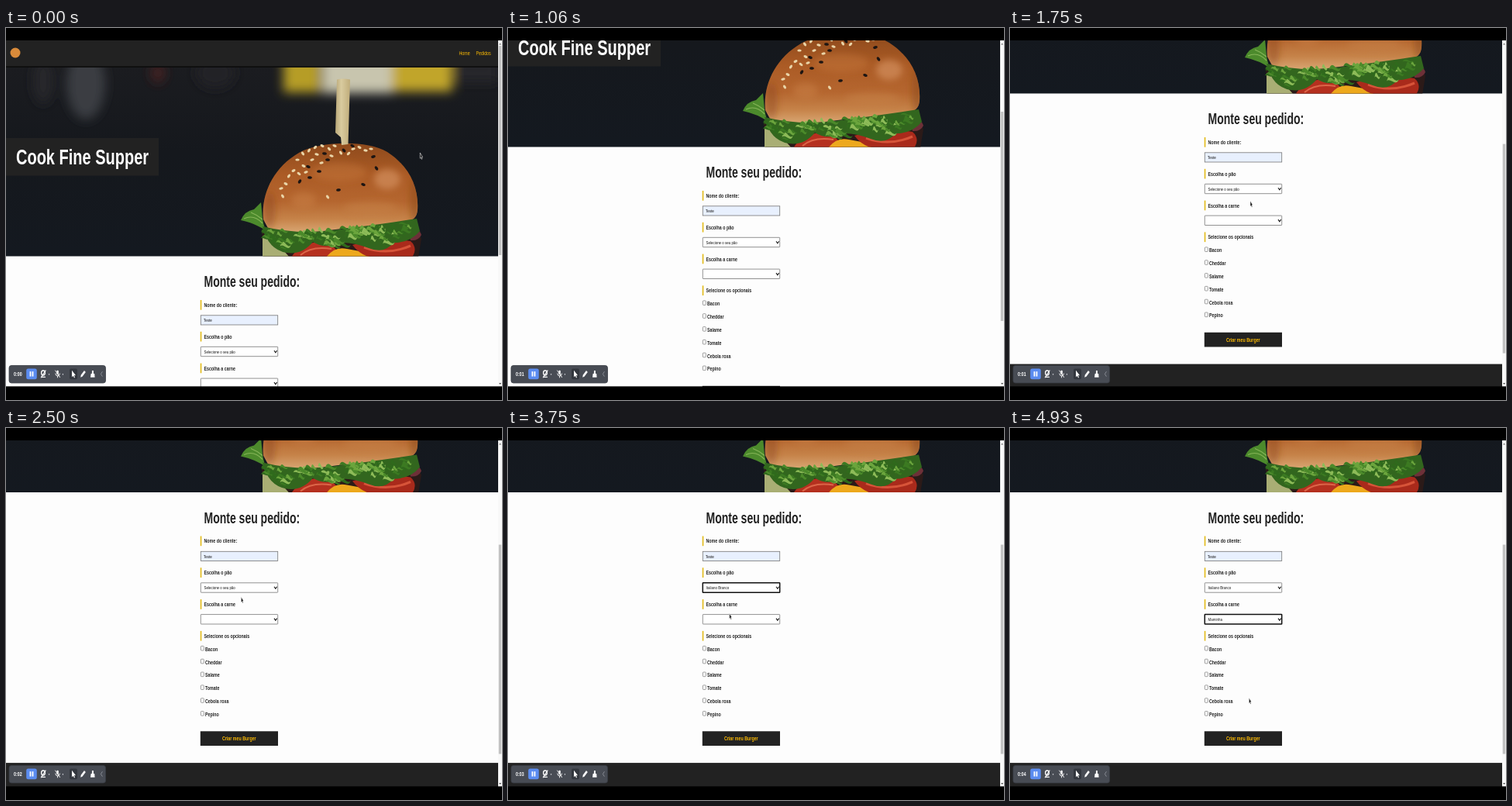
An HTML page that plays this animation: 640 by 480 pixels, repeating every 5000 ms.

```html
<!DOCTYPE html>
<html lang="pt">
<head>
<meta charset="utf-8">
<title>Monte seu pedido</title>
<style>
  html, body { margin: 0; width: 100%; height: 100%; overflow: hidden; background: #000; }
  svg { display: block; width: 640px; height: 480px; }
  text { font-family: "Liberation Sans", Arial, sans-serif; white-space: pre; }
</style>
</head>
<body>
<svg id="stage" viewBox="0 0 640 480"></svg>
<script>
const LOOP = 5000;
// The 1920px wide page is shown squeezed into the stage.
const SX = 1 / 3, SY = 0.47;
const INK = '#222', GOLD = '#fcba03';

const rect = (x, y, w, h, fill, more = '') =>
  `<rect x="${x}" y="${y}" width="${w}" height="${h}" fill="${fill}" ${more}/>`;
const path = (d, fill, more = '') => `<path d="${d}" fill="${fill}" ${more}/>`;
const oval = (x, y, rx, ry, fill, more = '') =>
  `<ellipse cx="${x}" cy="${y}" rx="${rx}" ry="${ry}" fill="${fill}" ${more}/>`;
const text = (x, y, size, str, fill = INK, more = '') =>
  `<text transform="translate(${x} ${y}) scale(${SX} ${SY})" font-size="${size}" fill="${fill}" ${more}>${str}</text>`;
const BOLD = 'font-weight="700"';

function random(seed) {
  return () => (seed = (seed * 16807) % 2147483647) / 2147483647;
}

const defs = `<defs>
  <linearGradient id="bun" x1="0" y1="0" x2="0" y2="1">
    <stop offset="0" stop-color="#8e4a1c"/><stop offset=".35" stop-color="#ab5b25"/>
    <stop offset=".65" stop-color="#b5662f"/><stop offset=".85" stop-color="#c68349"/>
    <stop offset="1" stop-color="#d9a673"/>
  </linearGradient>
  <linearGradient id="wall" x1="0" y1="0" x2="0" y2="1">
    <stop offset="0" stop-color="#1b1c20"/><stop offset=".45" stop-color="#15181d"/>
    <stop offset="1" stop-color="#141920"/>
  </linearGradient>
  <linearGradient id="wood"><stop offset="0" stop-color="#b9a777"/>
    <stop offset=".4" stop-color="#d9cb9f"/><stop offset="1" stop-color="#c0ad7b"/></linearGradient>
  <filter id="soft" x="-50%" y="-50%" width="200%" height="200%"><feGaussianBlur stdDeviation="7"/></filter>
  <filter id="glow" x="-50%" y="-50%" width="200%" height="200%"><feGaussianBlur stdDeviation="4"/></filter>
  <clipPath id="hero"><rect x="0" y="50" width="635" height="244.5"/></clipPath>
  <clipPath id="bunClip"><use href="#bunShape"/></clipPath>
</defs>`;

function lettuce() {
  const rnd = random(77), greens = ['#2f6a1c', '#4b8a2a', '#6ba53d', '#3c7a22', '#8dbb58'];
  let out = path('M303 248 Q308 236 320 234 L329 225 L331 246 Q333 258 336 262 Q322 252 303 248Z', '#4c8a2c')
    + path('M307 246 Q320 240 331 252 M316 238 Q324 241 331 247', 'none', 'stroke="#86b558" stroke-width="1.2"')
    + path('M331 256 Q380 268 430 260 Q490 252 530 246 L534 262 Q522 277 500 277 Q488 292 468 284 Q448 276 430 277 Q412 286 396 276 Q382 293 362 290 Q338 286 331 256Z', '#32661e');
  for (let i = 0; i < 105; i++) {
    const u = rnd(), x = 333 + 196 * u;
    const top = 260 - 12 * u * u, depth = 17 + 8 * Math.sin(u * 19 - 1.2);
    const y = top + depth * rnd(), w = 3 + 5 * rnd(), h = 2 + 3 * rnd();
    const color = greens[Math.floor(rnd() * greens.length)];
    out += path(`M${x - w} ${y + h} q${w * .3} ${-h * 2.4} ${w} ${-h} t${w} ${h * .4} q${-w * .2} ${h * 1.6} ${-w} ${h * .7} t${-w} ${-h * .1}z`, color);
  }
  return out;
}

function burger() {
  const pale = [383,162, 391,158, 399,154, 408,152, 417,156, 424,152, 376,170, 384,178, 371,184,
    365,191, 378,188, 361,201, 357,217, 395,170, 401,163, 420,165, 407,174, 448,156, 456,154,
    464,158, 471,156, 432,161, 442,162, 415,218, 387,186, 355,207];
  const dark = [429,209, 461,202, 478,181, 474,166, 415,170, 404,185, 390,179, 411,162,
    392,193, 379,198, 436,158, 447,152];
  const seeds = (list, fill, rx, ry) => {
    let out = '';
    for (let i = 0; i < list.length; i += 2) {
      const [x, y] = [list[i], list[i + 1]];
      out += oval(x, y, rx, ry, fill, `transform="rotate(${(x * 37 + y * 11) % 120 - 60} ${x} ${y})"`);
    }
    return out;
  };
  return path('M330 262 H532 L536 272 L532 296 H332Z', '#2b1a18')
    + path('M331 268 Q350 276 366 296 H331Z', '#a9ae74')
    + path('M368 296 Q378 279 402 276 Q425 276 431 296Z', '#b5301f')
    + path('M380 293 Q394 281 420 285', 'none', 'stroke="#dc6548" stroke-width="2"')
    + path('M413 296 Q424 281 440 285 L462 289 L470 296Z', '#eda81c')
    + path('M447 280 Q480 268 522 275 Q532 284 524 296 H470 Q456 292 447 280Z', '#a92a1b')
    + path('M462 283 Q492 294 522 281', 'none', 'stroke="#d75439" stroke-width="3"')
    + path('M520 262 Q534 258 536 267 Q532 275 522 274Z', '#6d3038')
    + `<path id="bunShape" fill="url(#bun)" d="M332 247C329 214 345 180 378 161C405 146 465 144 492 160C520 178 533 205 531 235C530 246 524 250 505 252C480 258 450 256 425 260C395 265 350 266 338 258Z"/>`
    + `<g clip-path="url(#bunClip)"><g filter="url(#glow)">`
    + oval(492, 195, 17, 13, '#d69361', 'opacity=".65"') + oval(430, 186, 35, 12, '#c97a3e', 'opacity=".4"')
    + oval(384, 222, 16, 10, '#c98145', 'opacity=".5"') + oval(340, 235, 8, 24, '#844019', 'opacity=".4"')
    + oval(528, 222, 7, 30, '#874519', 'opacity=".5"') + oval(470, 232, 35, 8, '#c58147', 'opacity=".5"')
    + `</g></g>`
    + seeds(pale, '#ead5a8', 2.7, 1.6) + seeds(dark, '#1d1512', 2.9, 1.8)
    + path('M427 66.5 Q435 64.5 444 66.5 L441.5 150 L433 151 L432 141 L425 135Z', 'url(#wood)')
    + lettuce();
}

function hero() {
  const blur = oval(103, 72, 25, 46, '#3a3d42') + oval(48, 68, 13, 30, '#25272b')
    + oval(196, 58, 9, 13, '#442023') + oval(270, 58, 25, 20, '#202125')
    + rect(358, 38, 48, 45, '#b69d25') + rect(408, 30, 92, 54, '#c8c5ae')
    + rect(498, 35, 78, 47, '#c1a52c') + rect(580, 30, 55, 40, '#27282c');
  return `<g clip-path="url(#hero)">${rect(0, 50, 635, 245, 'url(#wall)')}<g filter="url(#soft)">${blur}</g>${burger()}</g>`
    + rect(0, 142, 197, 48.5, INK)
    + text(13, 176, 60, 'Cook Fine Supper', '#fff', BOLD);
}

const label = (y, str) => rect(250.7, y - 6.3, 1.7, 12.7, '#e3bd22') + text(255.4, y + 2.6, 16, str, INK, BOLD);

const select = (y, id, value) =>
  rect(251.3, y, 99.4, 12.4, '#fff', `id="${id}Box" stroke="#767676" stroke-width=".8" rx=".5"`)
  + text(255.6, y + 8.3, 13.33, value, '#111', `id="${id}"`)
  + path(`M346 ${y + 5} l1.8 2.6 l1.8 -2.6`, 'none', 'stroke="#111" stroke-width="1.1"');

function form() {
  const extras = ['Bacon', 'Cheddar', 'Salame', 'Tomate', 'Cebola roxa', 'Pepino'];
  return text(255.5, 334, 42, 'Monte seu pedido:', INK, BOLD)
    + label(357.3, 'Nome do cliente:')
    + rect(251.3, 370.8, 99.4, 12.2, '#e8f0fe', 'stroke="#767676" stroke-width=".8"')
    + text(255, 379.2, 13.33, 'Teste', '#111')
    + label(398.1, 'Escolha o pão') + select(411.3, 'bread', 'Selecione o seu pão')
    + label(438.9, 'Escolha a carne') + select(452.1, 'meat', '')
    + label(479.7, 'Selecione os opcionais')
    + extras.map((name, i) => {
      const y = 496.5 + i * 16.83;
      return rect(251.4, y - 3.6, 3.9, 5.6, '#fff', 'rx=".8" stroke="#767676" stroke-width=".7"')
        + text(257, y + 2.8, 16, name, INK, BOLD);
    }).join('')
    + rect(250.8, 602.8, 100.2, 18.7, INK)
    + text(300.8, 614.6, 16, 'Criar meu Burger', GOLD, BOLD + ' text-anchor="middle"');
}

function page() {
  return rect(0, 16, 635, 660, '#fdfdfd')
    + hero()
    + rect(0, 16, 635, 34, INK) + rect(0, 49.3, 635, 1.6, '#0c0c0c')
    + `<circle cx="12" cy="32" r="6.5" fill="#d98b3a"/>`
    + text(584.5, 34.8, 16, 'Home', GOLD) + text(606.5, 34.8, 16, 'Pedidos', GOLD)
    + form()
    + rect(0, 643.6, 635, 34, INK);
}

function toolbar() {
  const line = (d, w = 1.2, c = '#fff') => path(d, 'none', `stroke="${c}" stroke-width="${w}" stroke-linecap="round"`);
  return rect(4, 435.5, 124.5, 22.5, '#484c54', 'rx="3" stroke="#393d44" stroke-width=".8"')
    + text(10, 449, 16, '0:00', '#fff', BOLD + ' id="clock"')
    + rect(26.2, 439.5, 13.6, 13.8, '#5b8cf0', 'rx="2.5"')
    + rect(30.6, 443.2, 1.8, 6.4, '#fff') + rect(33.6, 443.2, 1.8, 6.4, '#fff')
    + oval(48, 445, 2.4, 3, 'none', 'stroke="#fff" stroke-width="1.3"')
    + line('M46 450.4 H50.4') + line('M45.4 450.8 L51 442')
    + oval(55.6, 446.8, .7, .9, '#d0d3d8')
    + rect(65.4, 441.8, 2.4, 5.4, '#fff', 'rx="1.2"')
    + line('M63.8 446 Q64 449 66.6 449 Q69.2 449 69.4 446 M66.6 449 V451', .9) + line('M63.6 442 L69.6 450.6', .9)
    + oval(73.4, 446.8, .7, .9, '#d0d3d8')
    + rect(82, 439.6, 10, 13.6, '#33373e', 'rx="2"')
    + path('M85 441.8 V450.4 L86.7 448.7 L88 451.6 L89 451 L87.8 448.2 H90Z', '#fff')
    + path('M96.2 450.8 L96.7 447.7 L101 442 L102.8 444 L98.5 449.8Z', '#fff')
    + path('M111 442 H112.8 L113 446 H114.2 L114.6 450.8 H109 L109.6 446 H110.8Z', '#fff')
    + line('M124.2 443.6 L122.4 446.5 L124.2 449.4', .9, '#8f949c');
}

const stage = document.getElementById('stage');
stage.innerHTML = defs
  + `<g id="page">${page()}</g>`
  + rect(635, 16, 5, 447, '#f8f8f8')
  + rect(635.8, 23, 3.4, 270, '#c1c1c1', 'id="thumb"')
  + path('M636.2 21.4 l1.4 -2 l1.4 2z', '#666') + path('M636.2 458 l1.4 2 l1.4 -2z', '#444')
  + rect(0, 0, 640, 16, '#000') + rect(0, 462.4, 640, 18, '#000')
  + toolbar()
  + `<g id="cursor">${path('M0 0 V7.2 L1 6.2 L1.9 8.3 L2.8 7.7 L2 5.6 H3.3Z', '#111', 'stroke="#fff" stroke-width=".55"')}</g>`;

const el = id => document.getElementById(id);
const ease = u => u * u * (3 - 2 * u);

// Rows are [time, ...values]; values ease from one row to the next.
function at(track, t) {
  let i = 0;
  while (i < track.length - 2 && t >= track[i + 1][0]) i++;
  const [a, b] = [track[i], track[i + 1]];
  const u = ease(Math.min(1, Math.max(0, (t - a[0]) / (b[0] - a[0]))));
  return a.slice(1).map((v, k) => v + (b[k + 1] - v) * u);
}

const scrollTrack = [[0, 0], [60, 0], [460, 70], [600, 70], [1010, 141], [1180, 141], [1720, 210], [1760, 210], [1880, 211.5]];
const cursorTrack = [[0, 534.3, 161], [500, 524.3, 108], [1400, 330, 205], [1750, 310, 223],
  [2200, 304, 206], [2700, 303, 224], [3450, 303, 224], [3950, 276.3, 247], [4350, 276.3, 247], [4930, 308.3, 348]];

function setFocus(id, on) {
  const box = el(id + 'Box');
  box.setAttribute('stroke', on ? '#101010' : '#767676');
  box.setAttribute('stroke-width', on ? 1.5 : 0.8);
}

function draw(t) {
  const [scroll] = at(scrollTrack, t);
  const [x, y] = at(cursorTrack, t);
  el('page').setAttribute('transform', `translate(0 ${-scroll})`);
  el('thumb').setAttribute('y', 23 + scroll * 0.603);
  el('cursor').setAttribute('transform', `translate(${x} ${y})`);
  el('cursor').setAttribute('visibility', t > 850 && t < 1350 ? 'hidden' : 'visible');
  el('clock').textContent = '0:0' + Math.floor(t / 1000);
  el('bread').textContent = t < 2900 ? 'Selecione o seu pão' : 'Italiano Branco';
  el('meat').textContent = t < 4750 ? '' : 'Maminha';
  setFocus('bread', t >= 2900 && t < 4000);
  setFocus('meat', t >= 4750);
}

const start = performance.now();
function tick() {
  draw((performance.now() - start) % LOOP);
  requestAnimationFrame(tick);
}
draw(0);
requestAnimationFrame(tick);
</script>
</body>
</html>
```
